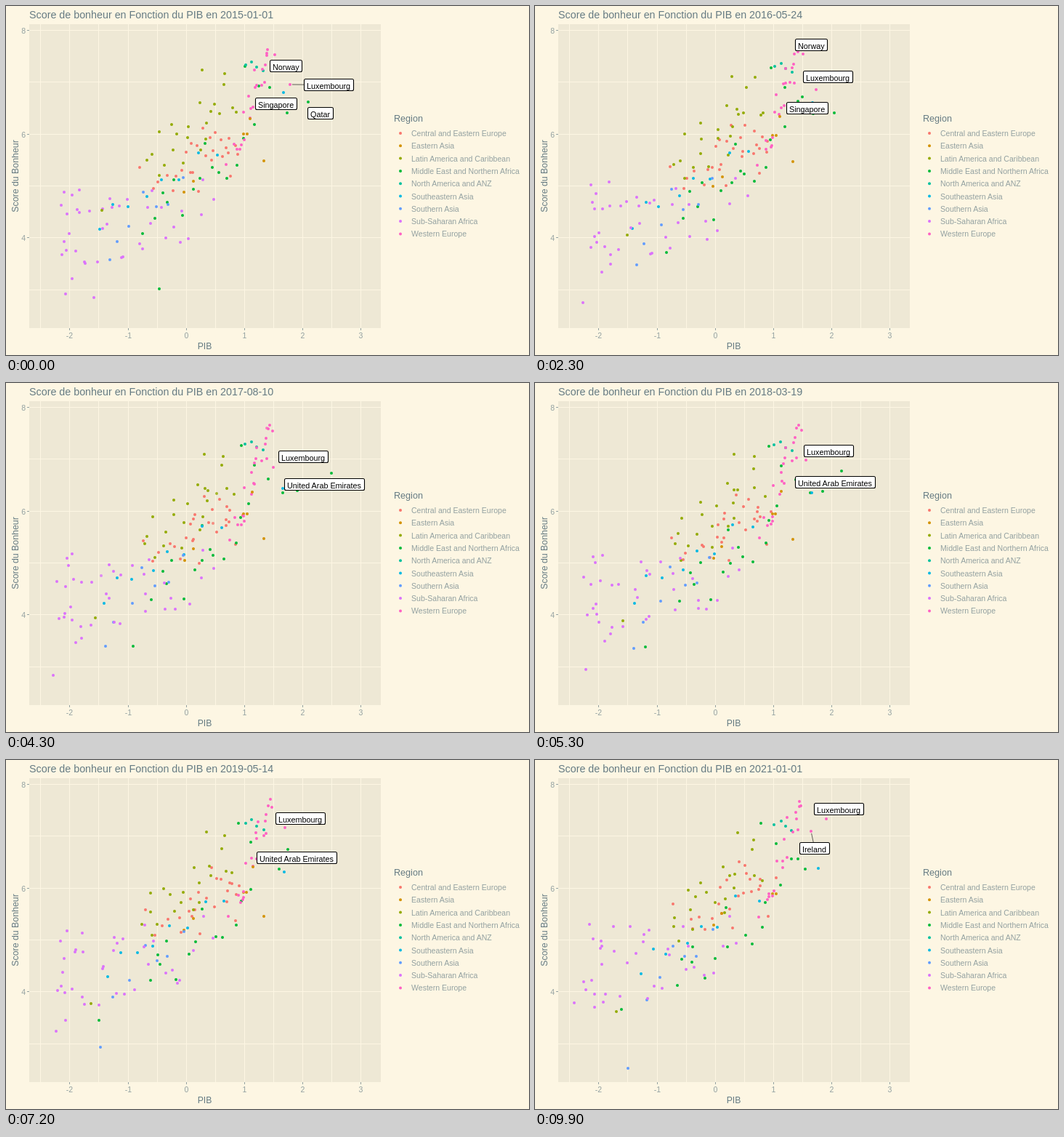
Recreate the animation shown at these times as an HTML page. Size 720 by 480 pixels, loop 10 s.

```html
<!DOCTYPE html>
<html lang="fr">
<head>
<meta charset="utf-8">
<title>Score de bonheur</title>
<style>
  html, body { margin: 0; width: 100%; height: 100%; overflow: hidden; background: #FDF6E3; }
  svg { display: block; font-family: "Liberation Sans", Arial, sans-serif; }
</style>
</head>
<body>
<svg id="stage" width="720" height="480" viewBox="0 0 720 480"></svg>
<script>
const FRAMES = 100, STEP = 100, LAST = FRAMES - 1;
const YEARS = 6, YEAR = LAST / YEARS;
const DARK = '#657B83', PALE = '#93A1A1', CREAM = '#FDF6E3';
const stage = document.getElementById('stage');

function set(el, attrs) {
  for (const key in attrs) el.setAttribute(key, attrs[key]);
}
function add(tag, attrs, parent = stage, text) {
  const el = document.createElementNS('http://www.w3.org/2000/svg', tag);
  set(el, attrs);
  if (text !== undefined) el.textContent = text;
  return parent.appendChild(el);
}
function write(text, x, y, size, fill, anchor = 'start', more = {}) {
  return add('text', { x, y, 'font-size': size, fill, 'text-anchor': anchor, ...more }, stage, text);
}
function line(x1, y1, x2, y2, stroke) {
  add('line', { x1, y1, x2, y2, stroke, 'shape-rendering': 'crispEdges' });
}

// Panel, grid and axes
add('rect', { width: 720, height: 480, fill: CREAM });
add('rect', { x: 32, y: 25, width: 484, height: 418, fill: '#EEE8D5' });
for (let i = -5; i <= 6; i++) {
  const x = Math.floor(248.25 + i * 40.1) + .5;
  line(x, 25, x, 443, CREAM);
  if (i % 2 === 0) {
    line(x, 443, x, 446, PALE);
    write(i / 2, x, 457, 10.5, PALE, 'middle');
  }
}
for (let i = 0; i <= 5; i++) {
  const y = Math.floor(33.6 + i * 71.3) + .5;
  line(32, y, 516, y, CREAM);
  if (i % 2 === 0) {
    line(29, y, 32, y, PALE);
    write(8 - i, 27, y + 4, 10.5, PALE, 'end');
  }
}
const title = write('', 32, 17, 14.3, DARK);
write('PIB', 273.5, 472, 12.2, DARK, 'middle');
write('Score du Bonheur', 0, 0, 12.35, DARK, 'middle', { transform: 'translate(17 234) rotate(-90)' });
write('Region', 534, 159, 12.6, DARK);

const regions = [
  ['Central and Eastern Europe', '#F8766D'],
  ['Eastern Asia', '#D39200'],
  ['Latin America and Caribbean', '#93AA00'],
  ['Middle East and Northern Africa', '#00BA38'],
  ['North America and ANZ', '#00C19F'],
  ['Southeastern Asia', '#00B9E3'],
  ['Southern Asia', '#619CFF'],
  ['Sub-Saharan Africa', '#DB72FB'],
  ['Western Europe', '#FF61C3']
];
const [CEE, EAS, LAT, MENA, ANZ, SEA, SAS, SSA, WEU] = regions.map(r => r[1]);
regions.forEach(([name, color], i) => {
  const y = 175 + i * 17.3;
  add('circle', { cx: 543, cy: y, r: 2, fill: color });
  write(name, 558, y + 4, 10.55, PALE);
});

// Seeded numbers in -1..1
let seed = 2015;
function rand() {
  seed = (seed * 16807) % 2147483647;
  return seed / 1073741823.5 - 1;
}
const clamp = v => Math.max(0, Math.min(1, v));
const mix = (a, b, k) => a + (b - a) * k;

// Position on a path of frame, x, y triples
function along(path, f) {
  for (let i = 3; i < path.length; i += 3) {
    const [fa, xa, ya, fb, xb, yb] = path.slice(i - 3, i + 3);
    if (f <= fb) {
      const k = clamp((f - fa) / (fb - fa));
      return [mix(xa, xb, k), mix(ya, yb, k)];
    }
  }
  return path.slice(-2);
}

const dots = [];
function dot(color, path, end = LAST) {
  dots.push({ el: add('circle', { r: 2, fill: color }), path, end });
  return path;
}

// A band of dots from one corner to another: skew crowds them to the left,
// noise scatters them, (dx, dy) is the shift of the whole band over the years
function cloud(color, n, [x0, y0], [x1, y1], { skew = 1, noise = 20, dx = 0, dy = 0 }) {
  for (let i = 0; i < n; i++) {
    const s = ((i + .5) / n) ** skew;
    const x = mix(x0, x1, s) + rand() * noise * .15;
    const y = mix(y0, y1, s) + (rand() + rand()) * noise * .65;
    const path = [];
    for (let year = 0; year <= YEARS; year++) {
      const k = year / YEARS, sway = year ? noise * .2 : 0;
      path.push(year * YEAR, x + dx * k + rand() * sway, y + dy * k + rand() * sway);
    }
    const leaves = i % 9 === 8;
    dot(color, path, leaves ? YEAR * (1 + i % 5) - 8 : LAST);
  }
}
cloud(CEE, 27, [174, 250], [316, 188], { skew: .55, noise: 40, dx: 8, dy: -22 });
cloud(EAS, 2, [325, 177], [334, 178], { noise: 2, dy: 8 });
cloud(EAS, 2, [238, 262], [264, 231], { noise: 8, dy: -30 });
cloud(LAT, 22, [197, 200], [321, 125], { noise: 44, dx: -8, dy: 14 });
cloud(MENA, 14, [199, 270], [343, 195], { noise: 34, dx: -8, dy: 14 });
cloud(MENA, 4, [318, 85], [395, 155], { noise: 14, dx: -15, dy: 5 });
cloud(ANZ, 4, [326, 77], [358, 92], { noise: 6, dy: 8 });
cloud(SEA, 8, [125, 300], [305, 185], { skew: 1.2, noise: 20, dx: 15, dy: -12 });
cloud(SAS, 6, [143, 290], [250, 245], { noise: 30 });
cloud(SSA, 40, [78, 310], [290, 265], { skew: 1.8, noise: 58, dx: -3, dy: -26 });
cloud(WEU, 20, [301, 245], [362, 58], { skew: .65, noise: 22, dx: 4, dy: -6 });

// Dots that stand apart from the clouds
dot(EAS, [0, 336, 155, LAST, 342, 144], 74);
dot(EAS, [0, 355, 213, LAST, 355, 216], 74);
dot(LAT, [0, 270, 88, 14, 270, 97, LAST, 279, 100]);
dot(LAT, [0, 132, 281, 14, 129, 311, LAST, 112, 346]);
dot(MENA, [0, 211, 389], 6);
dot(MENA, [0, 188, 313, 43, 175, 362, 62, 131, 363, LAST, 119, 343]);
dot(SAS, [0, 143, 349, 62, 135, 368, 82, 125, 421, LAST, 128, 424]);
dot(SSA, [0, 121, 401], 6);
dot(SSA, [0, 82, 396, 31, 60, 412, 62, 74, 387, LAST, 54, 334]);

const norway = dot(WEU, [0, 370, 67, LAST, 364, 64]);
const luxembourg = dot(WEU, [0, 391, 108, 31, 386, 117, 43, 368, 116, 62, 378, 97, LAST, 401, 81]);
const ireland = dot(WEU, [0, 345, 109, 82, 344, 99, LAST, 380, 98]);
const singapore = dot(SEA, [0, 382, 119, 62, 381, 156, LAST, 390, 149]);
const qatar = dot(MENA, [0, 416, 132, 14, 417, 147, 62, 391, 149], 62);
const emirates = dot(MENA, [0, 363, 112, 31, 370, 130, 43, 448, 124, 62, 398, 118, LAST, 362, 136]);

// Labels: tied to a dot, shown between two frames, placed by the start of the text
const labels = [];
function label(text, dotPath, from, to, path) {
  const group = add('g', {});
  const lead = add('line', { stroke: '#000', 'stroke-width': .6 }, group);
  const box = add('rect', { height: 16, rx: 2, fill: '#fff', stroke: '#000', 'stroke-width': 1.1 }, group);
  const words = add('text', { 'font-size': 10.8 }, group, text);
  const width = Math.round(words.getComputedTextLength() + 7.5);
  set(box, { width });
  labels.push({ group, lead, box, words, width, dotPath, from, to, path });
}
label('Norway', norway, 0, 41, [0, 367, 87, 14, 363, 59, 31, 362, 57]);
label('Singapore', singapore, 0, 41, [0, 347, 139, 14, 343, 134, 31, 357, 155]);
label('Qatar', qatar, 0, 8, [0, 419, 152]);
label('Luxembourg', luxembourg, 0, LAST,
  [0, 414, 113, 14, 373, 104, 31, 373, 100, 43, 379, 106, 62, 370, 91, 82, 379, 78, LAST, 388, 72]);
label('United Arab Emirates', emirates, 25, 90,
  [31, 311, 126, 43, 387, 144, 62, 340, 139, 82, 358, 139]);
label('Ireland', ireland, 75, LAST, [82, 349, 109, LAST, 368, 126]);

function placeLabel(l, f) {
  const shown = f >= l.from && f <= l.to;
  set(l.group, { visibility: shown ? 'visible' : 'hidden' });
  if (!shown) return;
  const [tx, ty] = along(l.path, f).map(Math.round);
  const x = tx - 3.5, y = ty - 12.5;
  set(l.words, { x: tx, y: ty + .5 });
  set(l.box, { x, y });
  const [px, py] = along(l.dotPath, f);
  const gap = Math.hypot(Math.max(x - px, 0, px - x - l.width), Math.max(y - py, 0, py - y - 16));
  const cx = x + l.width / 2, cy = y + 8;
  const k = 3 / Math.hypot(cx - px, cy - py);
  set(l.lead, { x1: mix(px, cx, k), y1: mix(py, cy, k), x2: cx, y2: cy, opacity: gap > 11 ? 1 : 0 });
}

function draw(f) {
  const day = Math.floor(2192 * f / LAST);
  const date = new Date(Date.UTC(2015, 0, 1 + day)).toISOString().slice(0, 10);
  title.textContent = 'Score de bonheur en Fonction du PIB en ' + date;
  for (const d of dots) {
    const [cx, cy] = along(d.path, Math.min(f, d.end)).map(Math.round);
    set(d.el, { cx, cy, opacity: clamp(1 - (f - d.end) / 8) });
  }
  for (const l of labels) placeLabel(l, f);
}

const begin = performance.now();
let current = -1;
function tick() {
  const f = Math.floor((performance.now() - begin) / STEP) % FRAMES;
  if (f !== current) draw(current = f);
  requestAnimationFrame(tick);
}
tick();
</script>
</body>
</html>
```
